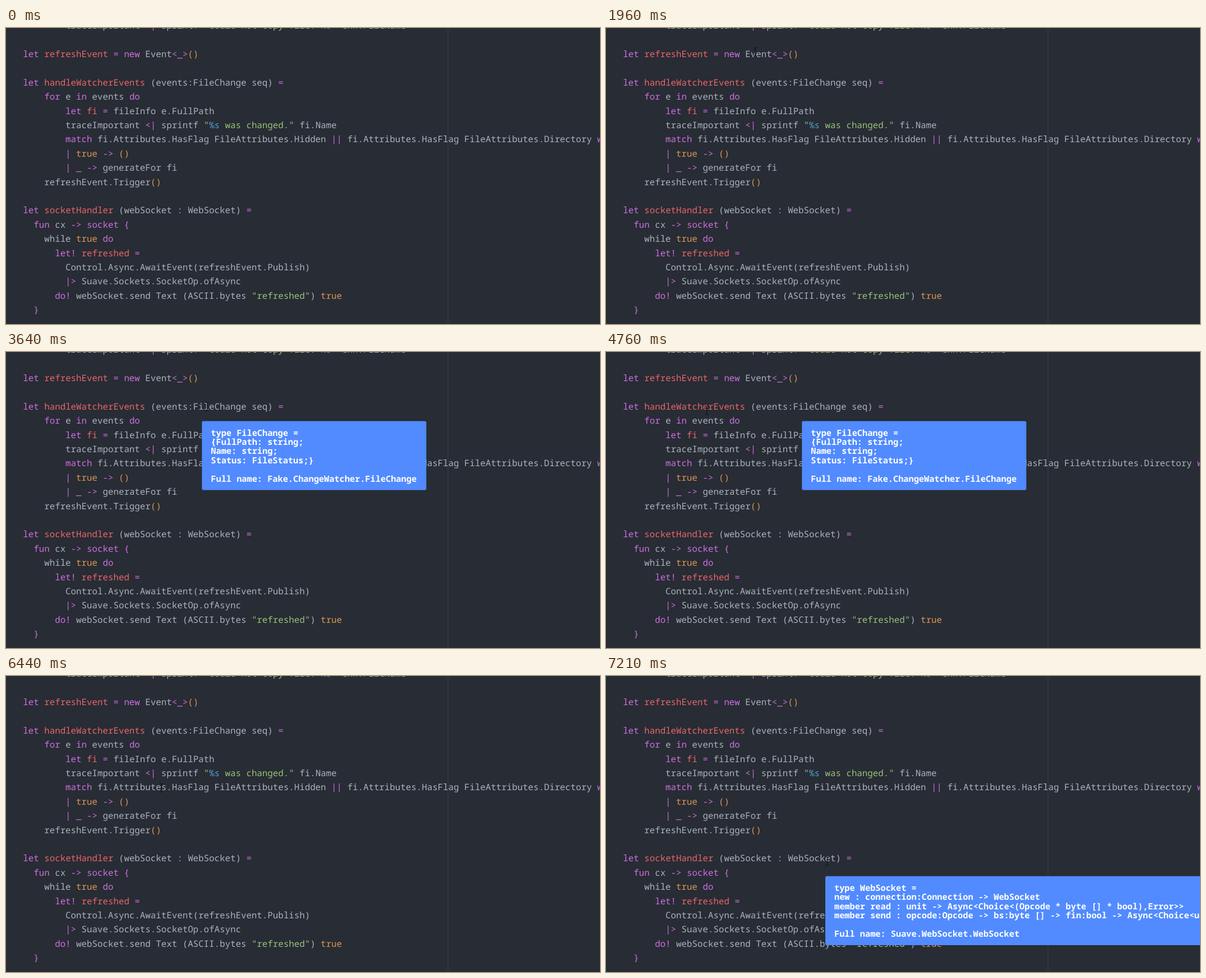
An HTML page for the animation above (8 s loop, 1059 px wide and 529 px high).

```html
<!DOCTYPE html>
<html lang="en">
<head>
<meta charset="utf-8">
<title>Editor tooltips</title>
<style>
  html, body { margin: 0; width: 100%; height: 100%; overflow: hidden; background: #282c34; }
  svg { display: block; width: 1059px; height: 529px; }
  text { font-family: "Noto Sans Mono", "DejaVu Sans Mono", monospace; white-space: pre; text-rendering: geometricPrecision; font-variant-ligatures: none; }
  .code { font-size: 15.8px; font-weight: 500; }
  .tip text { font-size: 15.29px; font-weight: 700; fill: #fff; }
</style>
</head>
<body>
<svg id="stage" viewBox="0 0 1059 529"></svg>
<script>
const LOOP = 8000, STEP = 70;
const LEFT = 30.3, BASE = 1.2, LINE = 25.4, TIP_LINE = 16.38;

const colors = {
  g: '#abb2bf', p: '#cc6fe3', r: '#e9656b', o: '#dc9656', s: '#98c379', b: '#4f9fd0'
};

// Each run starts with ^ and a colour key.
const code = [
  '^g        traceImportant ^p<| ^gsprintf ^s"Could not copy file: ^b%s^s" ^gexn.FileName',
  '',
  '^plet ^rrefreshEvent ^p= new ^gEvent^p<_>^o()',
  '',
  '^plet ^rhandleWatcherEvents ^g(events:FileChange seq) ^p=',
  '^p    for ^ge ^pin ^gevents ^pdo',
  '^p        let ^rfi ^p= ^gfileInfo e.FullPath',
  '^g        traceImportant ^p<| ^gsprintf ^s"^b%s^s was changed." ^gfi.Name',
  '^p        match ^gfi.Attributes.HasFlag FileAttributes.Hidden ^p|| ^gfi.Attributes.HasFlag FileAttributes.Directory ^pwith',
  '^p        | ^otrue ^p-> ^o()',
  '^p        | _ -> ^ggenerateFor fi',
  '^g    refreshEvent.Trigger^o()',
  '',
  '^plet ^rsocketHandler ^g(webSocket : WebSocket) ^p=',
  '^p  fun ^gcx ^p-> socket {',
  '^g    while ^otrue ^pdo',
  '^p      let! ^rrefreshed ^p=',
  '^g        Control.Async.AwaitEvent(refreshEvent.Publish)',
  '^p        |> ^gSuave.Sockets.SocketOp.ofAsync',
  '^p      do! ^gwebSocket.send Text (ASCII.bytes ^s"refreshed"^g) ^otrue',
  '^p  }'
];

const tips = [
  { from: 1050, to: 1680, x: 139, y: 67.5, w: 307.4, h: 74, lines: [
    'val refreshEvent : Event<unit>', '', 'Full name: Build.refreshEvent'] },
  { from: 3640, to: 4900, x: 349.3, y: 123.6, w: 400, h: 123.2, lines: [
    'type FileChange =', '{FullPath: string;', 'Name: string;', 'Status: FileStatus;}', '',
    'Full name: Fake.ChangeWatcher.FileChange'] },
  { from: 5180, to: 6230, x: 186, y: 127.2, w: 546.2, h: 74, lines: [
    'val handleWatcherEvents : events:seq<FileChange> -> unit', '',
    'Full name: Build.handleWatcherEvents'] },
  { from: 7210, to: LOOP, x: 391, y: 357.8, w: 780, h: 123.2, lines: [
    'type WebSocket =', 'new : connection:Connection -> WebSocket',
    'member read : unit -> Async<Choice<(Opcode * byte [] * bool),Error>>',
    'member send : opcode:Opcode -> bs:byte [] -> fin:bool -> Async<Choice<unit,Error>>', '',
    'Full name: Suave.WebSocket.WebSocket'] }
];

// Pointer moves: start time, number of steps, corner points.
const moves = [
  { at: 350, steps: 5, path: [[-30, 470], [3.5, 399], [142.5, 41]] },
  { at: 1680, steps: 9, path: [[142.5, 41], [269.5, 42], [237.5, 49]] },
  { at: 2590, steps: 2, path: [[237.5, 49], [237.5, 49.5], [237.5, 71.5]] },
  { at: 2800, steps: 8, path: [[237.5, 71.5], [358.5, 97.5]] },
  { at: 4550, steps: 4, path: [[358.5, 98.5], [179.5, 104]] },
  { at: 4900, steps: 2, path: [[179.5, 104], [182.5, 95]] },
  { at: 6230, steps: 9, path: [[182.5, 95], [394.5, 331]] }
];

function add(parent, name, attrs, content) {
  const el = document.createElementNS('http://www.w3.org/2000/svg', name);
  for (const key in attrs) el.setAttribute(key, attrs[key]);
  if (content) el.textContent = content;
  return parent.appendChild(el);
}

const stage = document.getElementById('stage');
add(stage, 'rect', { width: 1059, height: 529, fill: '#282c34' });
add(stage, 'rect', { x: 787.5, width: 1, height: 529, fill: '#3a3f48' });

code.forEach((line, i) => {
  const row = add(stage, 'text', { class: 'code', x: LEFT, y: BASE + i * LINE });
  line.split('^').slice(1).forEach(run =>
    add(row, 'tspan', { fill: colors[run[0]] }, run.slice(1)));
});

for (const tip of tips) {
  tip.el = add(stage, 'g', { class: 'tip' });
  add(tip.el, 'rect', { x: tip.x, y: tip.y, width: tip.w, height: tip.h, rx: 3, fill: '#528bff' });
  tip.lines.forEach((line, i) =>
    add(tip.el, 'text', { x: tip.x + 16, y: tip.y + 26 + i * TIP_LINE }, line));
}

const pointer = add(stage, 'path', {
  d: 'M-3 -7.5H-1L0 -6.5L1 -7.5H3M0 -6.5V6.5M-3 7.5H-1L0 6.5L1 7.5H3',
  fill: 'none', stroke: '#0c0d10', 'stroke-width': 1
});

function along(path, u) {
  const pos = u * (path.length - 1);
  const i = Math.min(Math.floor(pos), path.length - 2);
  const f = pos - i;
  return path[i].map((v, k) => v + (path[i + 1][k] - v) * f);
}

function render(t) {
  for (const tip of tips) {
    tip.el.setAttribute('visibility', t >= tip.from && t < tip.to ? 'visible' : 'hidden');
  }
  const move = moves.filter(m => t >= m.at).pop();
  pointer.setAttribute('visibility', move ? 'visible' : 'hidden');
  if (!move) return;
  const step = Math.floor((t - move.at) / STEP) + 1;
  const u = Math.min(step / move.steps, 1);
  pointer.setAttribute('transform', `translate(${along(move.path, u)})`);
}

function tick() {
  render(performance.now() % LOOP);
  requestAnimationFrame(tick);
}
tick();
</script>
</body>
</html>
```
